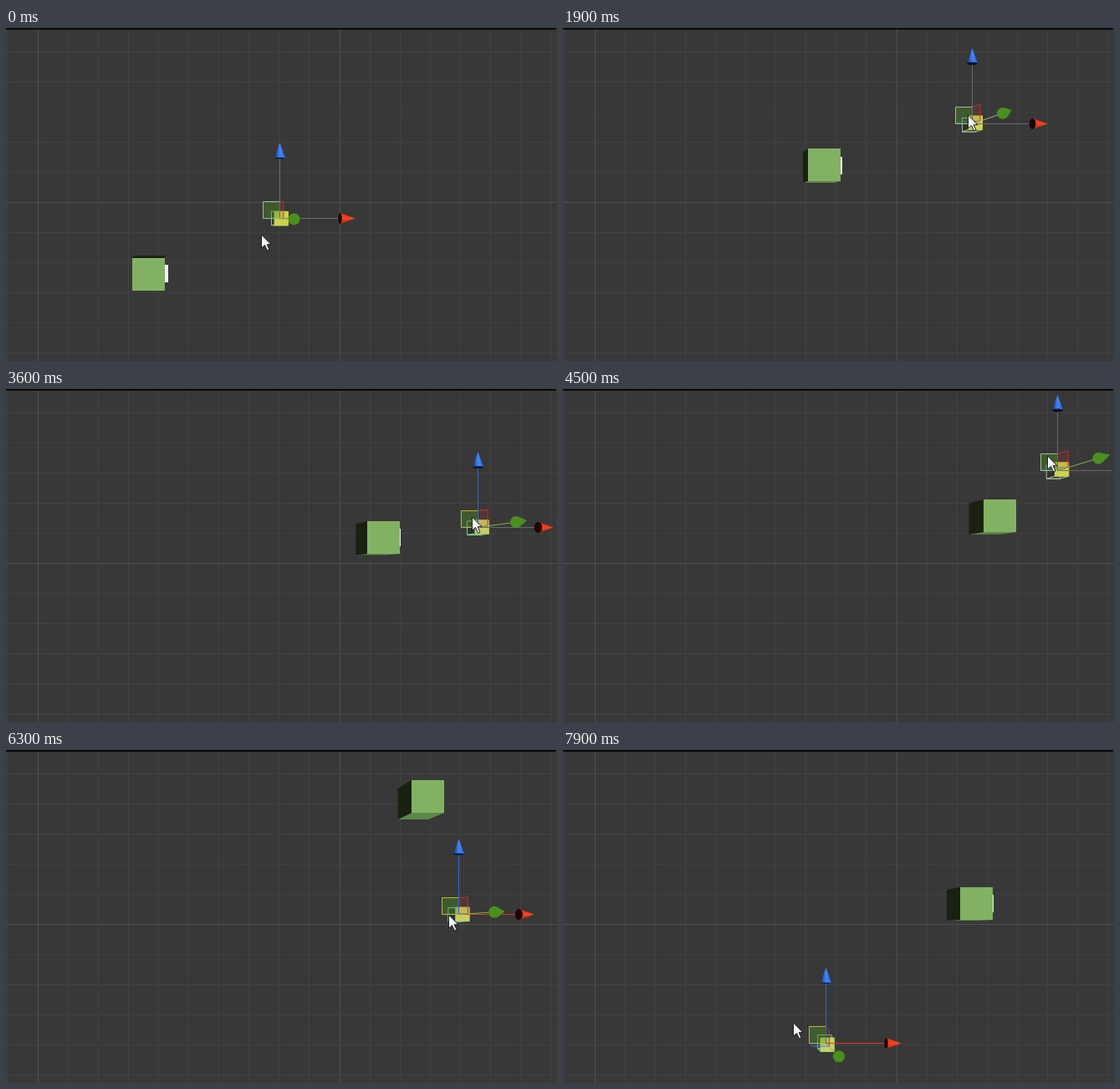
These frames come from a looping animation (659 px wide and 398 px high, 8000 ms). An HTML page with a canvas:

```html
<!DOCTYPE html>
<html lang="en">
<head>
<meta charset="utf-8">
<title>Cube following a handle</title>
<style>
html, body { margin: 0; width: 100%; height: 100%; overflow: hidden; background: #383838; }
canvas { display: block; }
</style>
</head>
<body>
<canvas id="stage" width="659" height="398"></canvas>
<script>
const ctx = document.getElementById('stage').getContext('2d');
const TICK = 100, TICKS = 80;
const VP = [185, 219]; // vanishing point of the view

// Every third or fourth tick the picture stands still; moves[t] counts the moves up to tick t
const moves = [];
for (let t = 0, count = -1, pause = 0, next = 4; t < TICKS; t++) {
  if (t === next) {
    pause++;
    next += pause >= 18 || Number.isInteger(Math.sqrt(pause)) && pause < 16 ? 4 : 3;
  } else count++;
  moves[t] = count;
}

// Waypoints: tick, x, y
const HANDLE = path([
  [7, 327, 227], [12, 418, 149], [17, 474, 104], [25, 541, 225], [29, 545, 263], [33, 564, 165],
  [42, 564, 165], [45, 591, 97], [48, 463, 78], [53, 295, 80], [61, 590, 93], [63, 541, 196],
  [69, 275, 290], [73, 590, 310], [77, 482, 349], [79, 314, 350]
]);
const CURSOR = path([ // relative to the handle
  [0, -21, 20], [3, -7, -5], [12, -2, -14], [25, -6, -7], [36, -6, -12], [45, -11, -17], [63, -11, 1], [79, -38, -24]
]);
const CUBE = path([
  [0, 151, 275], [12, 241, 185], [17, 282, 143], [25, 342, 157], [33, 408, 180], [36, 432, 158],
  [45, 503, 132], [54, 458, 62], [57, 442, 46], [63, 485, 36], [69, 466, 88], [79, 475, 164]
]);

// Smooth curve through waypoints that never overshoots them
function path(points) {
  const at = points.map(p => moves[p[0]]);
  const last = points.length - 1;
  const axis = k => {
    const rise = i => (points[i + 1][k] - points[i][k]) / (at[i + 1] - at[i]);
    const slope = i => {
      if (i === 0 || i === last) return 0;
      const a = rise(i - 1), b = rise(i);
      return a * b > 0 ? 2 * a * b / (a + b) : 0;
    };
    return m => {
      if (m <= at[0]) return points[0][k];
      const j = at.findIndex(v => v >= m), i = j - 1;
      const d = at[j] - at[i], f = (m - at[i]) / d, g = 1 - f;
      return Math.round(points[i][k] * g * g * (1 + 2 * f) + points[j][k] * f * f * (1 + 2 * g)
        + d * f * g * (slope(i) * g - slope(j) * f));
    };
  };
  const x = axis(1), y = axis(2);
  return tick => [x(moves[tick]), y(moves[tick])];
}

function rect(x, y, w, h, fill) {
  ctx.fillStyle = fill;
  ctx.fillRect(x, y, w, h);
}

function poly(points, fill, stroke) {
  ctx.beginPath();
  points.forEach(p => ctx.lineTo(...p));
  ctx.closePath();
  if (fill) { ctx.fillStyle = fill; ctx.fill(); }
  if (stroke) { ctx.strokeStyle = stroke; ctx.stroke(); }
}

function line(x1, y1, x2, y2, color) {
  ctx.strokeStyle = color;
  ctx.beginPath();
  ctx.moveTo(x1, y1);
  ctx.lineTo(x2, y2);
  ctx.stroke();
}

function oval(x, y, rx, ry, fill) {
  ctx.fillStyle = fill;
  ctx.beginPath();
  ctx.ellipse(x, y, Math.abs(rx), Math.abs(ry), 0, 0, 7);
  ctx.fill();
}

function shade(x1, y1, x2, y2, ...colors) {
  const g = ctx.createLinearGradient(x1, y1, x2, y2);
  colors.forEach((c, i) => g.addColorStop(i / (colors.length - 1), c));
  return g;
}

const corners = (x, y, w, h) => [[x, y], [x + w, y], [x + w, y + h], [x, y + h]];

function drawGrid() {
  rect(0, 0, 659, 398, '#383838');
  const column = k => rect(Math.floor(38 + 36.1 * k), 0, 1, 398, k % 10 ? '#414141' : '#505050');
  const row = k => rect(0, 208 + 36 * k, 659, 1, k ? '#414141' : '#505050');
  for (let k = -1; k < 18; k++) if (k % 10) column(k);
  for (let k = -5; k < 6; k++) if (k) row(k);
  column(0);
  column(10);
  row(0);
  rect(0, 0, 658, 2, '#080808');
}

function drawCube([x, y]) {
  const size = 39;
  const front = corners(x, y, size, size);
  const back = front.map(p => p.map((v, i) => v + (VP[i] - v) * 0.055));
  const side = (a, b, fill) => poly([front[a], front[b], back[b], back[a]], fill);
  const tab = Math.round(4 - 0.0108 * (x - 151));
  if (tab > 0) rect(x + size, y + 9 + Math.round((VP[1] - y - 20) * 0.0108), tab, 21, '#f2f2f2');
  if (y > VP[1]) side(0, 1, '#1b2212');
  if (y + size < VP[1]) side(2, 3, '#5c8849');
  if (x > VP[0]) side(0, 3, '#1a2110');
  rect(x, y, size, size, '#83b163');
}

function drawHandle([gx, gy], tick) {
  const within = (a, b) => tick >= a && tick < b;
  const late = tick >= 59;
  const active = within(9, 19) || within(31, 44) || late;
  const x = gx + 0.5, y = gy + 0.5;
  const dx = gx - VP[0], dy = gy - VP[1];
  const deep = k => [x + dx * k, y + dy * k];
  ctx.lineWidth = 1;

  // Selected box behind the handle
  const half = 8.2, [bx, by] = deep(-0.0125), [fx, fy] = deep(0.0125);
  const box = (cx, cy) => corners(cx - half, cy - half, 2 * half, 2 * half);
  const back = box(bx, by), front = box(fx, fy);
  const wire = active ? '#83d38d' : '#a9bd9c';
  poly(back, 'rgba(25,40,20,.4)', wire);
  poly([back[3], front[3], front[2], back[2]], null, wire);
  poly(front, active ? '#c9cf67' : '#cdd34c', active ? '#a9d070' : '#cdd34c');

  // Plane handles
  const [px, py] = deep(0.031);
  poly([[x, y], [x - 20, y], [px - 20, py], [px, py]], 'rgba(60,130,245,.25)', 'rgba(65,135,235,.65)');
  poly([[x, y], [x, y - 20], [px, py - 20], [px, py]], 'rgba(215,45,35,.18)', '#b8352a');
  poly(corners(x - 20, y - 20, 20, 20), 'rgba(75,140,35,.4)', active ? '#b5b82c' : '#9bbc8c');

  // Axes
  line(x, y, x, y - 72, active ? '#2f68c8' : '#656b70');
  line(x, y, x + 72, y, late ? '#d83b1e' : '#686868');
  const [cx, cy] = deep(0.12), [tx, ty] = deep(0.155);
  line(x, y, cx, cy, within(19, 31) ? '#a4ad9e' : '#7db944');

  const r = 7, reach = Math.hypot(tx - cx, ty - cy);
  oval(cx, cy, r, r, '#4b8f20');
  if (reach > r) {
    const dir = Math.atan2(ty - cy, tx - cx), open = Math.acos(r / reach);
    const edge = a => [cx + r * Math.cos(a), cy + r * Math.sin(a)];
    poly([edge(dir - open), [tx, ty], edge(dir + open)], '#4b8f20');
  }

  const red = shade(0, y - 6, 0, y + 6, '#d93218', '#fa431f', '#b82810');
  poly([[x + 72, y - 6.5], [x + 90, y], [x + 72, y + 6.5]], red);
  oval(x + 72, y, (dx + 72) * 0.0105, 6.5, '#1d0503');
  const blue = shade(x - 6, 0, x + 6, 0, '#17397e', '#3f84f8', '#2e6fe0');
  poly([[x - 6.5, y - 72], [x, y - 90.5], [x + 6.5, y - 72]], blue);
  oval(x, y - 72, 6.5, Math.max(0.5, (72 - dy) * 0.0105), '#081129');
}

function drawCursor([x, y]) {
  const arrow = [[0, 0], [0, 16], [4, 12.5], [7, 19], [9.5, 18], [6.7, 11.7], [11.5, 11.7]];
  poly(arrow.map(p => [x - 0.5 + p[0], y + p[1]]), '#f6f6f6', '#1c1c1c');
}

function draw(ms) {
  const tick = Math.floor(ms / TICK) % TICKS;
  const handle = HANDLE(tick), offset = CURSOR(tick);
  drawGrid();
  ctx.save();
  ctx.beginPath();
  ctx.rect(0, 2, 656, 396);
  ctx.clip();
  drawCube(CUBE(tick));
  drawHandle(handle, tick);
  drawCursor(handle.map((v, i) => v + offset[i]));
  ctx.restore();
}

let start;
function loop(now) {
  start ??= now;
  draw(now - start);
  requestAnimationFrame(loop);
}
requestAnimationFrame(loop);
</script>
</body>
</html>
```
